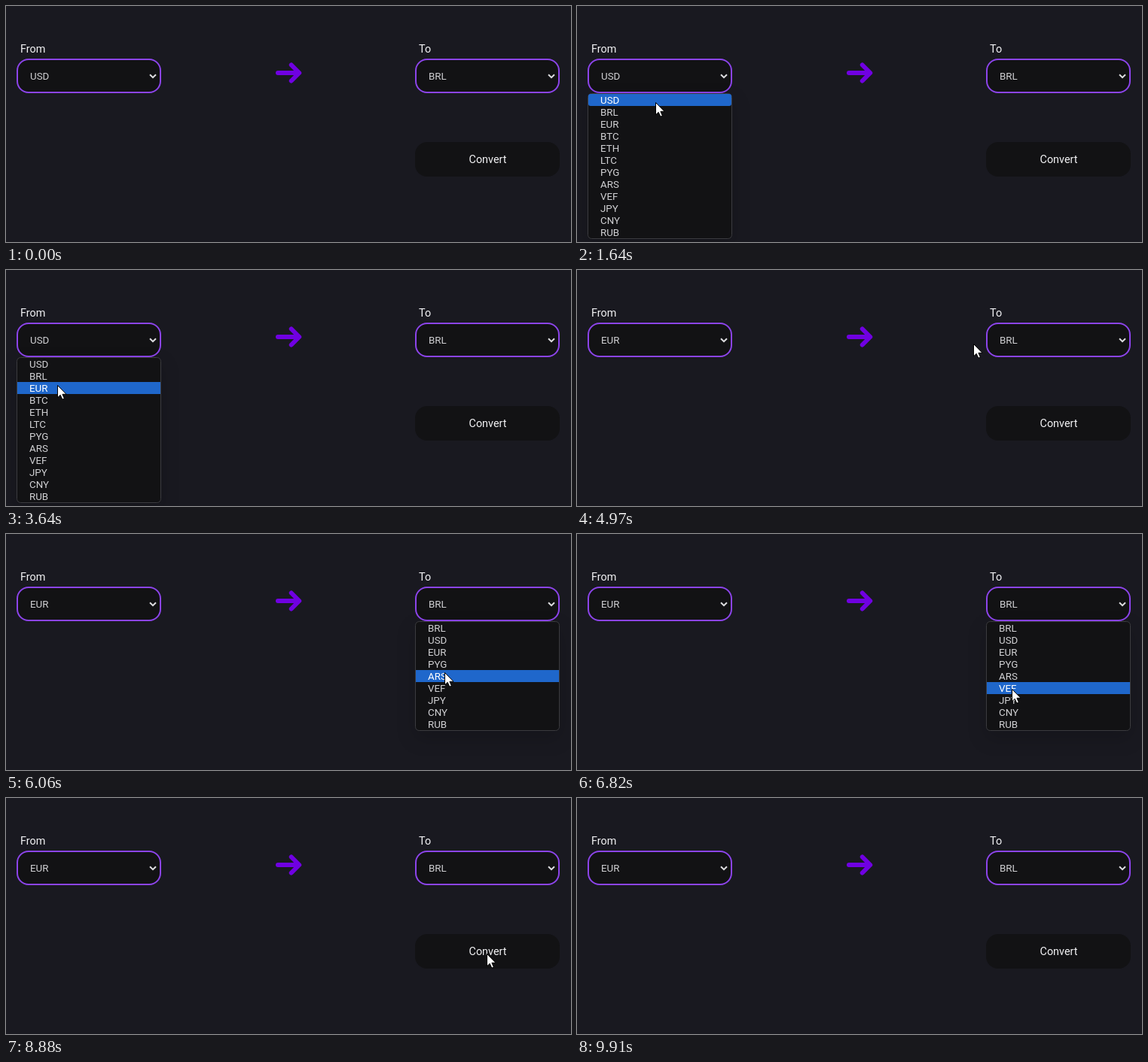
An HTML page for the animation above (9.94 s loop, 750 by 314 pixels).

```html
<!DOCTYPE html>
<html lang="en">
<head>
<meta charset="utf-8">
<title>Currency converter</title>
<style>
html, body { margin: 0; width: 100%; height: 100%; overflow: hidden; background: #191920; }
svg { display: block; width: 750px; height: 314px; font: 13.33px Roboto, sans-serif; }
.label { font-size: 14.4px; fill: #f2f2f4; }
.box { fill: #121214; }
.field { fill: #121214; stroke: #8c44ea; stroke-width: 2; }
.value { fill: #cfcfd2; }
.chevron { fill: none; stroke: #dedee0; stroke-width: 2; }
.arrow { fill: none; stroke: #7000e2; stroke-width: 6; stroke-linecap: round; stroke-linejoin: round; }
.popup { filter: drop-shadow(0 10px 12px rgba(0, 0, 0, .16)); }
.list { fill: #121214; stroke: #3b3b3f; }
.mark { fill: #1f67cb; }
.option { fill: #d0d0d3; }
.option.on { fill: #fff; }
.cursor { fill: #fff; stroke: #000; stroke-width: 1; stroke-linejoin: round; }
</style>
</head>
<body>
<svg id="stage" viewBox="0 0 750 314"></svg>
<script>
const LOOP = 9940;
const ROW = 16, LIST_TOP = 117;
const stage = document.getElementById('stage');

// Cursor path: time, x, y
const path = [
  [200, 400, 318], [620, 250, 180], [1000, 122, 98], [1330, 112, 98],
  [1640, 104, 128], [1980, 94, 200], [2330, 82, 277], [2620, 79, 294],
  [3100, 74, 226], [3640, 68, 153], [4080, 68, 153], [4300, 130, 140],
  [4700, 380, 108], [5080, 567, 97], [5350, 570, 97], [5700, 578, 128],
  [6060, 582, 184], [6550, 581, 251], [7000, 574, 165], [7250, 569, 127],
  [7500, 568, 127], [7880, 564, 152], [8350, 624, 200], [8700, 638, 207],
  [9250, 638, 207], [9750, 620, 318]
];

function add(tag, attrs, parent = stage, text = '') {
  const el = document.createElementNS('http://www.w3.org/2000/svg', tag);
  for (const key in attrs) el.setAttribute(key, attrs[key]);
  el.textContent = text;
  return parent.appendChild(el);
}

function addField(x, name) {
  add('text', { class: 'label', x: x + 5, y: 62 }, stage, name);
  add('rect', { class: 'field', x: x + 1, y: 71, width: 190, height: 44, rx: 15 });
  add('path', { class: 'chevron', d: `M${x + 177} 91.2l4 4 4-4` });
  return add('text', { class: 'value', x: x + 18, y: 98 });
}

function addPopup(x, names, open, close) {
  const group = add('g', { class: 'popup' });
  const height = names.length * ROW;
  add('rect', { class: 'list', x: x + .5, y: LIST_TOP - .5, width: 191, height: height + 1, rx: 5 }, group);
  const mark = add('rect', { class: 'mark', x: x + 1, width: 190, height: ROW, rx: 0 }, group);
  const options = names.map((name, i) =>
    add('text', { class: 'option', x: x + 17, y: LIST_TOP + 12.6 + i * ROW }, group, name));
  return (t, y) => {
    const shown = t >= open && t < close;
    group.style.display = shown ? '' : 'none';
    if (!shown) return;
    const row = Math.max(0, Math.min(names.length - 1, Math.floor((y - LIST_TOP) / ROW)));
    mark.setAttribute('y', LIST_TOP + row * ROW);
    mark.setAttribute('rx', row === 0 || row === names.length - 1 ? 3 : 0);
    options.forEach((el, i) => el.classList.toggle('on', i === row));
  };
}

const fromValue = addField(14, 'From');
addField(543, 'To').textContent = 'BRL';
add('path', { class: 'arrow', d: 'M361 89H389M378.8 78.5L389.2 89 378.8 99.5' });
add('rect', { class: 'box', x: 543, y: 181, width: 192, height: 46, rx: 16 });
add('text', { class: 'label', x: 639.5, y: 209, 'text-anchor': 'middle' }, stage, 'Convert');

const popups = [
  addPopup(14, 'USD BRL EUR BTC ETH LTC PYG ARS VEF JPY CNY RUB'.split(' '), 1300, 4030),
  addPopup(543, 'BRL USD EUR PYG ARS VEF JPY CNY RUB'.split(' '), 5300, 7400)
];
const cursor = add('path', {
  class: 'cursor',
  d: 'M.5 .5V16.8L4.2 13.3 6.8 19.2 9.4 18.1 6.9 12.3H12Z'
});

// Smooth curve through neighbouring points, resting where two match
function hermite(a, b, va, vb, u, span) {
  const u2 = u * u, u3 = u2 * u;
  return (2 * u3 - 3 * u2 + 1) * a + (u3 - 2 * u2 + u) * span * va
    + (3 * u2 - 2 * u3) * b + (u3 - u2) * span * vb;
}

function slope(i, axis) {
  const prev = path[i - 1], here = path[i], next = path[i + 1];
  if (!prev || !next) return 0;
  const before = here[axis] - prev[axis], after = next[axis] - here[axis];
  return before * after <= 0 ? 0 : (before + after) / (next[0] - prev[0]);
}

function pointAt(t) {
  let i = 0;
  while (i < path.length - 2 && t >= path[i + 1][0]) i++;
  const a = path[i], b = path[i + 1], span = b[0] - a[0];
  const u = Math.max(0, Math.min(1, (t - a[0]) / span));
  return [1, 2].map(k => hermite(a[k], b[k], slope(i, k), slope(i + 1, k), u, span));
}

function draw(now) {
  const t = now % LOOP;
  const [x, y] = pointAt(t);
  cursor.setAttribute('transform', `translate(${Math.round(x)} ${Math.round(y)})`);
  cursor.style.display = t > 200 && t < 9750 ? '' : 'none';
  fromValue.textContent = t >= 4030 ? 'EUR' : 'USD';
  popups.forEach(update => update(t, y));
}

const start = performance.now();
function tick() {
  draw(performance.now() - start);
  requestAnimationFrame(tick);
}
tick();
</script>
</body>
</html>
```
